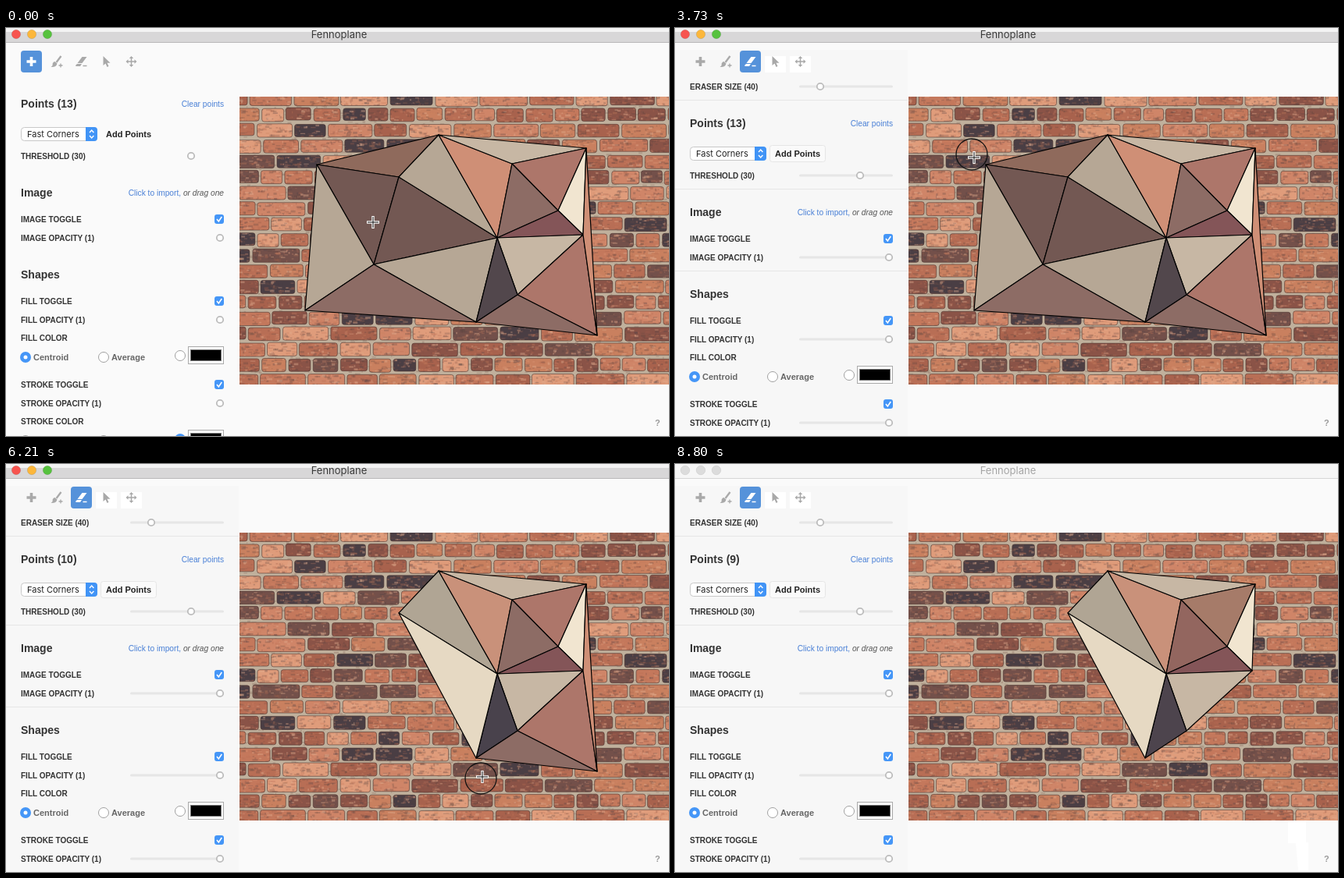
Write an HTML page with a canvas that moves like this. It is 849 px wide and 523 px high and loops after 8.91 s.

```html
<!DOCTYPE html>
<html lang="en">
<head>
<meta charset="utf-8">
<title>Fennoplane</title>
<style>
html, body { margin: 0; width: 100%; height: 100%; overflow: hidden; background: #fafafa; }
canvas, svg { position: absolute; left: 0; top: 0; }
canvas { left: 299px; top: 88px; }
text { font-family: "Liberation Sans", Arial, sans-serif; white-space: pre; }
.ui { font-family: Inter, sans-serif; }
.head { font: bold 14px "Liberation Sans", Arial, sans-serif; fill: #333; }
.label { font: bold 10px "Liberation Sans", Arial, sans-serif; fill: #333; }
.opt { font: bold 11px "Liberation Sans", Arial, sans-serif; fill: #666; }
.link { font-size: 10.2px; fill: #4a80d6; }
</style>
</head>
<body>
<canvas id="wall" width="550" height="369"></canvas>
<svg width="849" height="523">
  <g id="panel"></g>
  <g id="tools"></g>
  <path id="trail" d="M785 457h23v28h3v36h-13l-3-35h-10z" fill="#fff"/>
  <text x="831" y="510" class="opt" style="fill:#999">?</text>
  <g id="mesh" stroke="#000" stroke-width="1.2" stroke-linejoin="round"></g>
  <circle id="ring" r="20" fill="none" stroke="#111" stroke-width="1.3"/>
  <g id="cursor"><path d="M-8 0H8M0-8V8" stroke="#fff" stroke-width="3.4"/><path d="M-7 0H7M0-7V7" stroke="#111"/></g>
  <g id="bar"></g>
</svg>
<script>
const $ = id => document.getElementById(id);
const LOOP = 8910, PICK = 2090, PRESS = 3730, RELEASE = 7430, BLUR = 8800;

// Brick wall
function drawWall() {
  let seed = 29;
  const rnd = (a = 1, b = 0) => {
    seed = (seed * 16807) % 2147483647;
    return b + (a - b) * seed / 2147483647;
  };
  const tones = ['#c4785c', '#b86e55', '#cf8568', '#a8624d', '#c9805f', '#8a5347', '#df9c7b', '#73504a', '#4a3e44'];
  const tone = () => tones[Math.floor(rnd(tones.length))];
  const c = $('wall').getContext('2d');
  const specks = (n, x, y, w, h, alpha, color) => {
    c.globalAlpha = alpha;
    for (let i = 0; i < n; i++) {
      c.fillStyle = color || tone();
      c.fillRect(x + rnd(w), y + rnd(h), rnd(7, 1), rnd(3, 1));
    }
    c.globalAlpha = 1;
  };
  c.fillStyle = '#c0b09c';
  c.fillRect(0, 0, 550, 369);
  specks(2000, 0, 0, 550, 369, .3, '#85695a');
  for (let row = 0; row < 19; row++) {
    const y = -6 + row * 20.06, small = row % 4 == 1;
    for (let x = -rnd(40); x < 550;) {
      const w = small ? rnd(36, 25) : rnd(62, 38), h = rnd(17.5, 15.5), top = y + rnd(1.5);
      c.save();
      c.beginPath();
      c.roundRect(x, top, w, h, 3);
      c.fillStyle = tone();
      c.fill();
      c.clip();
      specks(w * .7, x - 3, top, w, h, .28);
      specks(w * .25, x - 3, top, w, h, .25, '#56403e');
      specks(w * .15, x - 3, top, w, h, .4, '#e0ad90');
      c.restore();
      c.strokeStyle = 'rgba(70,48,44,.55)';
      c.stroke();
      x += w + rnd(4, 2.5);
    }
  }
}

// Side panel, laid out for the eraser tool
const text = (x, y, s, cls, more = '') => `<text x="${x}" y="${y}" class="${cls}" ${more}>${s}</text>`;
const rect = (x, y, w, h, fill, r = 0, stroke = 'none') =>
  `<rect x="${x}" y="${y}" width="${w}" height="${h}" rx="${r}" fill="${fill}" stroke="${stroke}"/>`;
const dot = (x, y, r, fill, stroke = 'none', sw = 1) =>
  `<circle cx="${x}" cy="${y}" r="${r}" fill="${fill}" stroke="${stroke}" stroke-width="${sw}"/>`;
const label = (y, s) => text(19, y + 4, s, 'label');
const slider = (y, s, x, erasing) => label(y, s) +
  (erasing ? rect(159, y - 1.5, 120, 3, '#e6e6e6', 1.5) : '') + dot(x, y, 4.2, '#fff', '#bcbcbc', 1.8);
const check = (y, s) => label(y, s) + rect(267, y - 6, 12, 12, '#4596f7', 3) +
  `<path d="M270 ${y}l2.3 3 4-6" fill="none" stroke="#fff" stroke-width="1.6"/>`;
const radio = (x, y, on) => on
  ? dot(x, y, 7, '#4596f7') + dot(x, y, 2.5, '#fff')
  : dot(x, y, 6.5, '#fff', '#a0a0a0');
const colors = (y, picked) => radio(25, y, picked == 0) + text(35, y + 4, 'Centroid', 'opt') +
  radio(125, y, picked == 1) + text(135, y + 4, 'Average', 'opt') + radio(223, y - 2, picked == 2) +
  rect(233.5, y - 13.5, 45, 22, '#fff', 0, '#a9a9a9') + rect(236.5, y - 9.5, 39, 14, '#000', 0, '#777');

function panel(count, erasing) {
  const back = erasing ? rect(0, 28, 298, 495, '#f7f7f7') +
    [92, 206, 311].map(y => rect(0, y, 298, 1, '#e6e6e6')).join('') +
    slider(75, 'ERASER SIZE (40)', 186, true) +
    rect(121.5, 150.5, 71, 21, '#fafafa', 3, '#e6e6e6') : '';
  return back +
    text(19, 127, `Points (${count})`, 'head') +
    text(279, 126, 'Clear points', 'link', 'text-anchor="end"') +
    rect(19.5, 152.5, 97, 17, '#fff', 4, '#c8c8c8') +
    '<path d="M102 152h11a4 4 0 0 1 4 4v10a4 4 0 0 1-4 4h-11z" fill="#4194f6"/>' +
    '<path d="M107 159l2.7-3 2.7 3M107 163l2.7 3 2.7-3" fill="none" stroke="#fff" stroke-width="1.4"/>' +
    text(27, 165, 'Fast Corners', 'ui', 'font-size="11" fill="#222"') +
    text(128, 165, 'Add Points', 'opt', 'style="fill:#222"') +
    slider(189, 'THRESHOLD (30)', 237, erasing) +
    text(19, 241, 'Image', 'head') +
    text(279, 240, 'Click to import,<tspan font-style="italic" fill="#555"> or drag one</tspan>', 'link', 'text-anchor="end"') +
    check(270, 'IMAGE TOGGLE') + slider(294, 'IMAGE OPACITY (1)', 274, erasing) +
    text(19, 346, 'Shapes', 'head') +
    check(375, 'FILL TOGGLE') + slider(399, 'FILL OPACITY (1)', 274, erasing) +
    label(422, 'FILL COLOR') + colors(447, 0) +
    check(482, 'STROKE TOGGLE') + slider(506, 'STROKE OPACITY (1)', 274, erasing) +
    label(529, 'STROKE COLOR') + colors(554, 2);
}

// Icons, each centred on 0,0
const icons = [
  '<path d="M-6 0H6M0-6V6" stroke-width="3.6"/>',
  '<path d="M6-7L0 1" stroke-width="2.4"/><path d="M-2 0l3 2.5q-1 5-8 4.5q3-2 2-4q1-3 3-3z" stroke="none"/><path d="M3 5h5M5.5 2.5v5" stroke-width="1.3"/>',
  '<path d="M1-6h6L1 2h-6z" stroke="none"/><path d="M-5.5 3h6l-2 3h-5q-1.5 0-.5-1.5z" stroke="none"/><path d="M2 5.5H7" stroke-width="1.5"/>',
  '<path d="M-4-7V5l3-2.5 2 4.5 2-1-2-4.2h4z" stroke="none"/>',
  '<path d="M-5 0H5M0-5V5" stroke-width="1.5"/><path d="M0-7l2.7 3h-5.4zM0 7l2.7-3h-5.4zM-7 0l3-2.7v5.4zM7 0l-3-2.7v5.4z" stroke="none"/>'
];
const toolbar = active => (active ? rect(115, 36, 27, 21, '#fff') + rect(147, 36, 27, 21, '#fff') : '') +
  icons.map((icon, i) => {
    const x = 32.5 + i * 32, on = i == active, ink = on ? '#fff' : '#a9a9a9';
    return (on ? rect(x - 13.5, 29, 27, 28, '#5592da', 4) : '') +
      `<g transform="translate(${x} 43)" fill="${ink}" stroke="${ink}">${icon}</g>`;
  }).join('');

const titleBar = idle => rect(0, 0, 849, 18, idle ? '#f6f6f6' : '#d8d7d8') +
  (idle ? '' : rect(0, 0, 849, 5, '#f3f3f3')) + rect(0, 18, 849, 1, idle ? '#d6d6d6' : '#b9b8b9') +
  ['#f7544f', '#fcb73b', '#57c23e'].map((c, i) =>
    dot(13 + i * 20, 8, 5.7, idle ? '#dcdcdc' : c, idle ? '#cfcfcf' : 'rgba(0,0,0,.15)', .7)).join('') +
  text(426.5, 13, 'Fennoplane', 'ui', `font-size="13" text-anchor="middle" fill="${idle ? '#a5a5a5' : '#3a3a3a'}"`);

// Mesh: corner letters mapped to fills, changed by each erased corner
const corner = {
  A: [398, 175], B: [554, 137], C: [743, 154], D: [503, 191], E: [648, 174], F: [707, 234], G: [739, 265],
  H: [629, 269], I: [471, 303], J: [383, 362], K: [602, 377], L: [655, 342], M: [757, 394]
};
const fills = {
  ABD: '#8f6a5c', ADI: '#735853', AIJ: '#b6a795', DHI: '#735853', BDH: '#b6a795', BEH: '#cf8f76',
  BCE: '#c7b7a4', CEF: '#ad766a', CFG: '#f1e5d0', EFH: '#8d6c65', FGH: '#845558', GHL: '#c7b7a4',
  HIK: '#b6a795', HKL: '#52474c', IJK: '#8d6c65', GLM: '#ad766a', KLM: '#8d6c65', CGM: '#cf8f76'
};
const erasures = [
  [3790, 'A', { DIJ: '#8a736b', DHI: '#7f5e54' }],
  [4730, 'J', { BEH: '#c9917a' }],
  [5430, 'I', { DHK: '#e6d9c3', BDH: '#b0a594', HKL: '#49424c' }],
  [6800, 'M', { CEF: '#a67b69', EFH: '#93665f', HKL: '#4d444d' }]
];
function mesh(erased) {
  const all = { ...fills };
  for (const [, gone, added] of erasures.slice(0, erased)) {
    for (const k in all) if (k.includes(gone)) delete all[k];
    Object.assign(all, added);
  }
  return Object.entries(all).map(([k, fill]) =>
    `<polygon points="${[...k].map(c => corner[c])}" fill="${fill}"/>`).join('');
}

// Pointer: time, x, y; seen only at ticks about 60 ms apart inside each span
const path = [
  [300, 470, 249], [1200, 138, 53], [1370, 134, 52], [1500, 134, 52], [1790, 105, 51], [2260, 105, 51],
  [2610, 459, 239], [2850, 459, 239], [3490, 380, 162], [3670, 380, 162], [3730, 383, 166], [3970, 391, 202],
  [4150, 389, 249], [4210, 386, 260], [4610, 384, 334], [4790, 388, 346], [5150, 417, 329], [5190, 427, 322],
  [5470, 459, 295], [5580, 467, 298], [5900, 545, 370], [6180, 608, 403], [6210, 610, 401], [6440, 624, 405],
  [6800, 747, 403], [6840, 768, 405], [7020, 782, 400], [7670, 782, 402], [8140, 805, 534]
];
const spans = [[360, 1200], [1260, 1370], [1550, 1790], [2320, 2610], [2910, 3490], [3730, 4610], [4670, 5150],
  [5190, 5520], [5580, 6180], [6210, 6440], [6500, 6800], [6840, 7070], [7730, 8140]];
const ticks = [0];
for (const [a, b] of spans) {
  for (let t = a; t < b; t += 60) ticks.push(t);
  ticks.push(b);
}
function at(t) {
  const i = path.findIndex(p => p[0] > t);
  if (i == 0) return path[0].slice(1);
  if (i < 0) return path[path.length - 1].slice(1);
  const [t0, x0, y0] = path[i - 1], [t1, x1, y1] = path[i];
  let k = (t - t0) / (t1 - t0);
  if (t < 3500) k = k * k * (3 - 2 * k);
  return [x0 + (x1 - x0) * k, y0 + (y1 - y0) * k];
}
const place = (el, [x, y]) => el.setAttribute('transform', `translate(${x.toFixed(1)} ${y.toFixed(1)})`);
const show = (el, on) => el.style.display = on ? '' : 'none';

let last = '';
function frame(now) {
  const t = now % LOOP;
  const erased = erasures.filter(e => e[0] <= t).length;
  const erasing = t >= PICK, idle = t >= BLUR;
  const state = [erased, erasing, idle].join();
  if (state != last) {
    last = state;
    $('panel').innerHTML = panel(13 - erased, erasing);
    $('panel').setAttribute('transform', `translate(0 ${erasing ? 0 : -25})`);
    $('tools').innerHTML = toolbar(erasing ? 2 : 0);
    $('mesh').innerHTML = mesh(erased);
    $('bar').innerHTML = titleBar(idle);
  }
  const n = ticks.filter(k => k <= t).length - 1;
  place($('cursor'), at(ticks[n]));
  place($('ring'), at(ticks[Math.max(0, n - 1)]));
  show($('ring'), t >= PRESS && t < RELEASE);
  show($('trail'), t >= 8140);
  requestAnimationFrame(frame);
}
drawWall();
requestAnimationFrame(frame);
</script>
</body>
</html>
```
